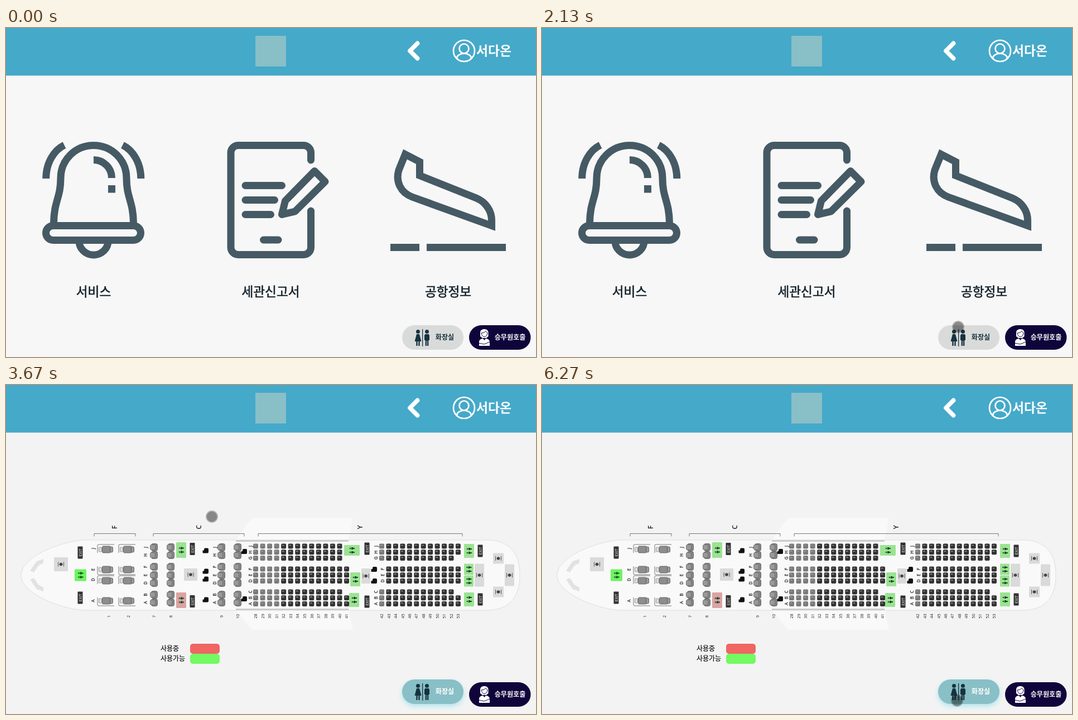
An HTML page that plays this animation: 950 by 590 pixels, repeating every 6350 ms.

```html
<!DOCTYPE html>
<html lang="ko">
<head>
<meta charset="utf-8">
<style>
  html, body { margin: 0; width: 100%; height: 100%; overflow: hidden; }
  svg { display: block; width: 950px; height: 590px; font-family: "Noto Sans CJK KR", "Noto Sans CJK", "Noto Sans", sans-serif; }
  .line { fill: none; stroke: #455a64; stroke-width: 13; }
  .round { stroke-linecap: round; stroke-linejoin: round; }
  .mid { text-anchor: middle; }
  .label { font-size: 22.6px; fill: #16222b; stroke: #16222b; stroke-width: .6px; }
  .legend { font-size: 12px; fill: #111; stroke: #111; stroke-width: .2px; }
  .pill { font-size: 12.1px; font-weight: 700; }
  #toilet { fill: #17323f; }
  #toilet .bg { fill: #d9dbda; }
  #toilet.hover { transform: translateY(-5px); }
  #toilet.hover .bg { fill: #89bfc6; filter: drop-shadow(0 4px 4px rgba(130, 220, 235, .6)); }
  #toilet.hover text { fill: #fff; }
</style>
</head>
<body>
<svg viewBox="0 0 950 590">
  <rect id="back" width="950" height="590"/>
  <rect width="950" height="85.400" fill="#45a9c9"/>
  <rect x="447" y="14" width="55" height="55" fill="#89bfc6"/>
  <g fill="none" stroke="#fff" stroke-width="2.700" stroke-linecap="round">
    <path d="M737.500 27.500L724 41L737.500 54.500" stroke-width="7.800" stroke-linejoin="round"/>
    <circle cx="821" cy="41" r="19"/>
    <circle cx="821" cy="37" r="8.500"/>
    <path d="M808 54C809 43 833 43 834 54"/>
  </g>
  <text class="mid" x="874.5" y="49" font-size="22.8" font-weight="700" fill="#fff">서다온</text>

  <g id="menu">
    <g class="line">
      <rect x="71.5" y="354.5" width="170" height="26" rx="13"/>
      <path d="M85.5 350C86 310 98 305 98 269A59 58.5 0 0 1 216 269C216 305 228 310 228.5 350"/>
      <path d="M131 382A26 25 0 0 0 183 382M157 236.5A32.5 32.5 0 0 1 189.5 269M189.5 282V295.5"/>
      <path d="M71.7 270C71.7 242 86 219 104.5 210M241.8 270C241.8 242 227.5 219 209 210"/>
    </g>
    <g class="line round">
      <path d="M546.5 237V223.5a13 13 0 0 0-13-13H416a13 13 0 0 0-13 13V393.5a13 13 0 0 0 13 13H533.5a13 13 0 0 0 13-13V328"/>
      <path d="M429 282.5H494.5M429 308.5H481.5M429 334.5H474.5M461.5 380H488"/>
      <path d="M494.5 334.5L500.5 310L553 256.5L572 275.5L518 329Z"/>
    </g>
    <path class="line" d="M715.5 226.5L741.5 240V264.5L843 305C860 312 870.5 328 870.5 345V354.5L728 303C707 295 698 275 704 255ZM689 393.5H741M754 393.5H896"/>
    <text class="label mid" x="157" y="480.5">서비스</text>
    <text class="label mid" x="474.5" y="480.5">세관신고서</text>
    <text class="label mid" x="792.5" y="480.5">공항정보</text>
  </g>

  <g id="cabin">
    <path d="M411 278C422 268 432 246 443 238H622L614 278ZM411 404C422 414 432 431 443 439H622L614 404Z" fill="#f9f9f9"/>
    <path d="M140 278H860C902 278 921 300 921 341C921 382 902 404 860 404H140C95 401 27 373 27 341C27 309 95 281 140 278Z" fill="#f9f9f9" stroke="#dedede"/>
    <path d="M412 279.5H614M412 402.5H614" stroke="#ccc" stroke-width="3"/>
    <path d="M43 333L55 316L67 312V319L58 324L50 336ZM43 349L55 366L67 370V363L58 358L50 346Z" fill="#e2e2e2"/>
    <g id="fittings"></g>
    <text class="legend" x="277" y="477">사용중</text>
    <text class="legend" x="277" y="494.5">사용가능</text>
    <rect x="330" y="464" width="53" height="18" rx="5" fill="#ef6663"/>
    <rect x="330" y="482" width="53" height="18" rx="5" fill="#73fa62"/>
  </g>

  <circle id="ripple" cx="748" cy="551" fill="none" stroke="#3f81a2" stroke-width="1.4"/>
  <g id="toilet">
    <rect class="bg" x="710" y="533" width="110" height="44" rx="22"/>
    <circle cx="738.5" cy="544.5" r="3.5"/>
    <path d="M736 549H741L744.5 562H741.7V570H739.3V562H737.7V570H735.300V562H732.500Z"/>
    <circle cx="754.5" cy="544.5" r="3.5"/>
    <path d="M751.500 549H757.500L759 551V560H757.300V570H755V561H754V570H751.700V560H750V551ZM746 540H747.300V571H746Z"/>
    <text class="pill mid" x="786.5" y="558.5">화장실</text>
  </g>
  <rect x="830" y="533" width="110.5" height="44" rx="22" fill="#10053b"/>
  <g fill="#fff">
    <path d="M850 553V546C850 538 864.500 538 864.500 546V553L861 556H854Z"/>
    <path d="M848 570V563C848 559 852 557 855 557L857.5 560L860 557C863 557 867 559 867 563V570Z"/>
    <path d="M852 547Q858 547 860 543.5L863 547Q862 553 857.5 554Q853 553 852 547ZM847 565L857 567L867 563" fill="none" stroke="#10053b"/>
    <text class="pill mid" x="903.5" y="558.5">승무원호출</text>
  </g>
  <g id="pointer"><circle r="11" opacity=".25"/><circle r="9.3" opacity=".26"/></g>
</svg>
<script>
const $ = id => document.getElementById(id);
const LOOP = 6350, TICKS = 95, HOVER = 41, SWITCH = 43;
const AXIS = 341; // the cabin is symmetric about this height

const box = (x, y, w, h, fill, rx = 1, border = 'none') =>
  `<rect x="${x - w / 2}" y="${y - h / 2}" width="${w}" height="${h}" rx="${rx}" fill="${fill}" stroke="${border}" stroke-width=".8"/>`;
const turned = (text, x, y, size, weight = 400, fill = '#222') =>
  `<text class="mid" transform="translate(${x} ${y}) rotate(-90)" dy=".36em" font-size="${size}" font-weight="${weight}" fill="${fill}" font-family="Open Sans, sans-serif">${text}</text>`;
const letters = (text, x, rows) => [...text].map((c, i) => turned(c, x, rows[i], 8, 600)).join('');
const times = (n, draw) => Array.from({ length: n }, (_, i) => draw(i)).join('');
const mirror = (x, d, draw) => draw(x, AXIS - d) + draw(x, AXIS + d);

function zone(name, left, right) {
  const middle = (left + right) / 2;
  return `<path d="M${left} 271.5V266.5H${right}V271.5" fill="none" stroke="#777"/>` + turned(name, middle, 255, 12, 600);
}

function firstSeat(x, y, side) {
  return `<path d="M${x + 15} ${y + side * 9}H${x - 13}q-2 0-2 ${-side * 2}v${-side * 13}" fill="none" stroke="#777"/>` +
    box(x - 10, y, 5, 8, '#ddd', 1, '#888') + box(x + 1, y, 15, 12, '#8d8d8d', 2, '#555') + box(x + 10, y, 5, 10, '#999', 2, '#555');
}
const businessSeat = (x, y) => box(x + 1, y, 11, 13, '#858585', 3, '#555') + box(x - 2, y, 9, 9, '#999', 2, '#666');
const economySeat = (x, y, fill) => box(x, y, 9, 9, fill, 2) + box(x - 1, y - 1.5, 4, 1.2, '#aaa');
const crewSeat = (x, y) => box(x + 1, y, 8, 9, '#111', 2) + box(x - 3, y + 2, 5, 5, '#111');
const exit = (x, y) => box(x, y, 9, 22, '#333') + turned('EXIT', x, y, 7, 400, '#fff');

const person = (x, y) =>
  `<circle cx="${x - 3}" cy="${y}" r="1.3"/><path d="M${x - 1} ${y - 2}h3v1h3v2h-3v1h-3z"/>`;
const lavatory = (x, y, w = 18, h = 25, fill = '#9be392') =>
  box(x, y, w, h, fill) + `<g fill="#1d4a2b">${person(x, y - 3.5)}${person(x, y + 3.5)}</g>`;
const galley = (x, y, w, h) => box(x, y, w, h, '#dadada') +
  `<path d="M${x - 5} ${y - 4}v8m10-8v8m-8-4h6" stroke="#555" fill="none"/><circle cx="${x}" cy="${y}" r="2.8" fill="#444"/>`;

// Nine rows in three groups
const economyRows = Array.from({ length: 9 }, (_, i) => 289 + 41 * Math.floor(i / 3) + 10.7 * (i % 3));
const businessRows = [-50, -36, -15, 0, 14, 35, 49].map(d => AXIS + d);

function economyBlock(x0, step, first, count, greys, seated) {
  return times(count, i => {
    const x = x0 + i * step;
    return turned(first + i, x, 414.5, 7.5) + economyRows.map((y, row) =>
      seated(i, row) ? economySeat(x, y, i < greys ? '#7a7a7a' : '#333') : '').join('');
  });
}

function fittings() {
  const business = (first, x, gap) => times(2, i =>
    turned(first + i, x + gap * i, 415, 7.5) + businessRows.map(y => businessSeat(x + gap * i, y)).join(''));
  const first = times(2, i => {
    const x = 179 + 38 * i;
    return turned(i + 1, 184 + 35 * i, 415, 7.5) +
      [46, 10].map(d => mirror(x, d, (x, y) => firstSeat(x, y, d > 20 === y > AXIS ? 1 : -1))).join('')
        .replace(/^$/, '');
  });
  const isInner = row => row === 2 || row === 6;
  const isCentre = row => row > 2 && row < 6;
  return [
    zone('F', 158, 232), zone('C', 264, 427), zone('Y', 452, 818),
    first, business(7, 265, 30), business(9, 386, 29),
    economyBlock(447.5, 12.54, 28, 14, 4, (i, row) => i < 13 || isCentre(row) || row > 6),
    economyBlock(673.5, 12.45, 42, 12, 1, (i, row) => isCentre(row) ? i > 0 : i < 11 || !isInner(row)),
    letters('JEDA', 156, [-48, -10, 8, 46].map(d => AXIS + d)),
    letters('JHFEDBA', 250, businessRows), letters('JHFEDBA', 374, businessRows),
    letters('JHGFEDCBA', 438, economyRows), letters('JHG', 663, economyRows),
    letters('FED', 675, economyRows.slice(3)), letters('CBA', 663, economyRows.slice(6)),
    lavatory(133.5, AXIS, 21, 21, '#6cf45f'), lavatory(314, 296, 18, 28), lavatory(314, 386, 18, 28, '#dca3a3'),
    lavatory(620, 296.5, 28, 19), lavatory(626, 348.5), lavatory(624, 385.5),
    mirror(829.5, 10.5, (x, y) => lavatory(x, y, 17, 20)), mirror(830, 43.5, (x, y) => lavatory(x, y)),
    galley(98.5, 321.5, 25, 25), galley(331, 340, 24, 22), galley(645, 342.5, 16, 27),
    galley(848.5, AXIS, 17, 41), galley(902.5, AXIS, 17, 39), mirror(882.5, 30, (x, y) => galley(x, y, 19, 19)),
    mirror(133, 40.5, exit), mirror(334, 47, exit), mirror(647, 47.5, exit), mirror(850, 43.5, exit),
    mirror(358, 44, crewSeat), mirror(358, 7, crewSeat), mirror(427, 42.5, crewSeat), mirror(660, 10.5, crewSeat)
  ].join('');
}
$('fittings').innerHTML = fittings();

// Pointer stops: tick, x, y
const stops = [
  [1, 815, 615], [8, 747, 579], [12, 747, 579], [19, 718, 476], [22, 743, 495], [32, 746, 536],
  [38, 749, 553], [46, 750, 552], [47, 723, 474], [50, 409, 286], [52, 322, 246], [55, 369, 236],
  [65, 369, 236], [71, 459, 93], [75, 524, 138], [85, 587, 222], [87, 598, 236], [94, 744, 566]
];

function pointerAt(tick) {
  const i = Math.max(1, stops.findIndex(stop => stop[0] >= tick));
  const [t0, x0, y0] = stops[i - 1], [t1, x1, y1] = stops[i];
  const k = Math.max(0, (tick - t0) / (t1 - t0));
  return `translate(${x0 + (x1 - x0) * k} ${y0 + (y1 - y0) * k})`;
}

function draw() {
  const progress = performance.now() % LOOP / LOOP;
  const tick = Math.min(TICKS - 1, Math.floor(progress * TICKS + .3));
  const onCabin = tick >= SWITCH;
  $('back').setAttribute('fill', onCabin ? '#f3f3f3' : '#f7f7f7');
  $('menu').style.display = onCabin ? 'none' : '';
  $('cabin').style.display = onCabin ? '' : 'none';
  $('toilet').classList.toggle('hover', tick >= HOVER);
  $('ripple').setAttribute('r', Math.max(0, (tick - 41.5) * 14.6));
  $('ripple').style.display = tick > HOVER && tick < 49 ? '' : 'none';
  $('pointer').setAttribute('transform', pointerAt(tick));
  requestAnimationFrame(draw);
}
draw();
</script>
</body>
</html>
```
